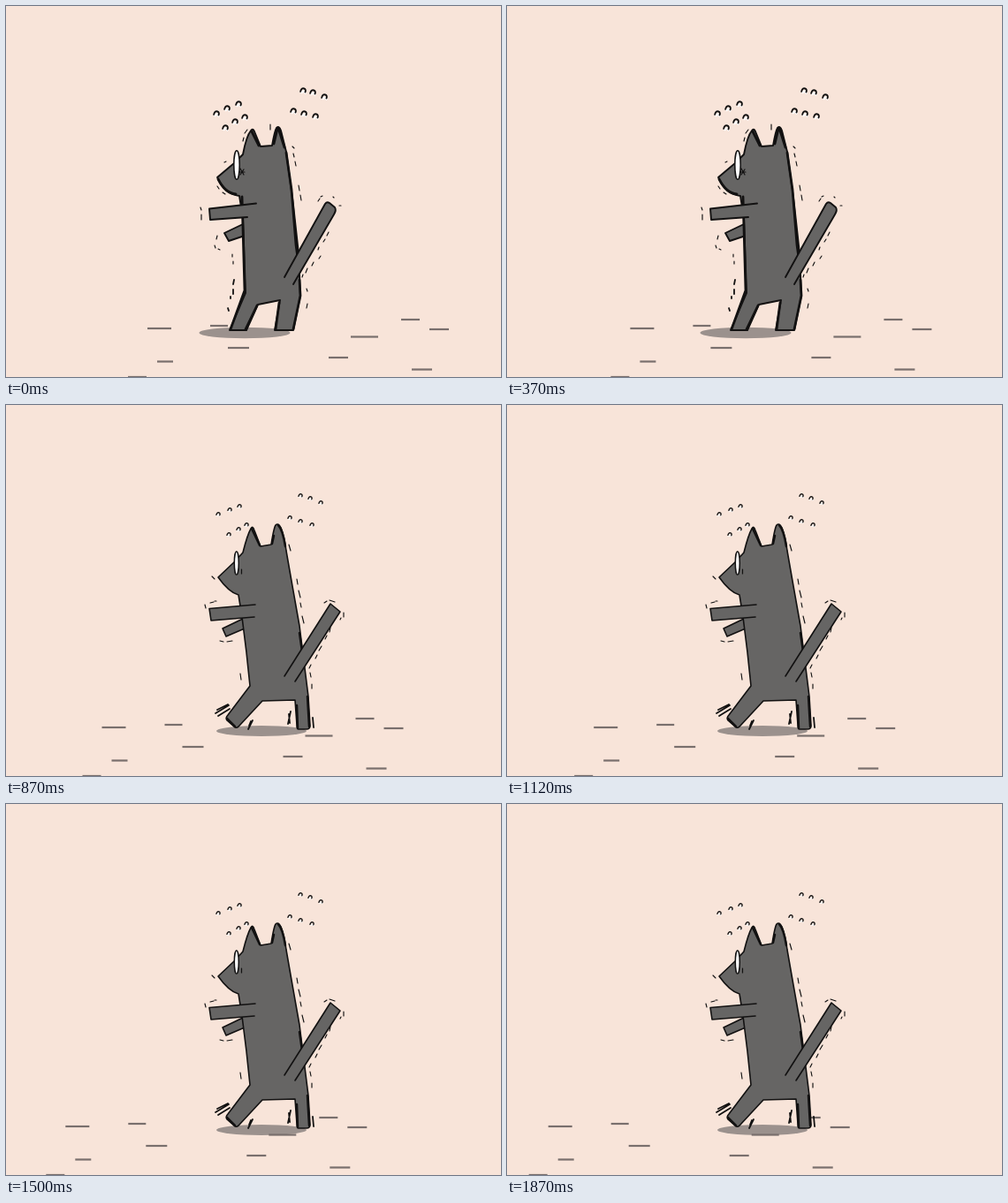
Animation, 560 px wide and 420 px high, one loop 2 s. Source, as an HTML page with a canvas:

```html
<!DOCTYPE html>
<html lang="en">
<head>
<meta charset="utf-8">
<title>Walking cat</title>
<style>
html, body { margin: 0; width: 100%; height: 100%; overflow: hidden; background: #f8e4d9; }
canvas { display: block; }
</style>
</head>
<body>
<canvas id="stage" width="560" height="420"></canvas>
<script>
const ctx = document.getElementById('stage').getContext('2d');
const INK = '#121111', FUR = '#666564';

// x, y, width of the ground dashes at the start of the loop
const dashes = [
  [160, 365, 27], [231, 362, 20], [447, 355, 21], [479, 366, 22], [390, 374.5, 31],
  [251, 387, 24], [365, 398, 22], [171, 402.5, 18], [459, 411.5, 23], [138, 420, 21]
];

// The three poses of the walk, in playing order
const poses = [
  {
    line: 1.9, curl: 1.25, shadow: [270, 370, 51.5, 6.3],
    body: 'M239 194L258 178L268 168Q272 147 277 141Q279 138 281 142L288 159L301 158Q304 141 306 138Q309 135 311 141L317 165L325 225L331 280L333 328L325 367H304L310 333L285 338L272 367H253L271 325L268 240L264 215Q247 213 239 194Z',
    bold: 'M317 166L323 208L328 270L331 292M332 310L333 328L325 366M267 216L268 250L270 322L254 366M278 142L286 158M307 139L303 156M308 138L315 160M309 336L305 366M284 339L271 366M240 196Q248 212 260 213',
    tail: 'M315 307L361 224Q363 221 366 223L372 228Q374 231 371 236L325 315',
    arm: 'M283 223.5L230 229.5L231 242L273 239',
    back: 'M270 246L247 257L252 266L270 260',
    lens: [261, 180, 3.2, 16.3], eye: 'M265 184l4 7M269 185l-4 6M264 188h6',
    curls: [[238, 121], [250, 115], [263, 110], [248, 137], [259, 130], [270, 125],
            [336, 95], [347, 97], [360, 102], [325, 118], [337, 121], [350, 124]],
    marks: 'M273 140l-3 4M269 149l-1 4M299 134v6M324 159l2 2M325 167l1 4M327 176l1 5M331 203l1 6M333 214l1 6M353 221l2-3M356 216l2-1M370 216l1 1M377 226h2M365 256l-2 4M361 264l-2 3M354 273l-1 3M356 283l-2 3M348 290l-2 4M341 297l-2 5M336 304l-1 3M340 320l1 3M341 337l-1 5M247 177l2-1M239 204l2 3M245 211l3 2M220 228l1 3M221 236v6M239 260l-1 4M236 271l1 3M240 275l2 1M256 281v3M257 289v3',
    jolts: 'M258 310l-1 5M257 321v5M254 329v2M251 342l1 3'
  },
  {
    line: 1.6, curl: .9, shadow: [289, 369, 51, 6],
    body: 'M240 195L258 178L268 167Q273 147 277 140Q279 136 281 142L288 160L300 158Q303 139 305 136Q308 133 311 139Q315 149 317 165L324 205L332 250L337 290L342 330L344 363Q344 367 340 367H331Q329 367 329 362L327 334L290 335L264 363Q261 367 258 364L250 357Q248 354 251 351L276 318L272 280L267 240L263 215Q252 212 240 195Z',
    bold: 'M278 140L287 159M308 136Q313 141 316 160M303 148L301 157M250 355L259 364M341 330L343 364M332 258L336 286M329 340L330 366',
    tail: 'M315 307L367 225L378 234L327 313',
    arm: 'M282 226L230 230.5L232 244L281 240',
    back: 'M270 241L245 253L249 262L270 253',
    lens: [260.8, 179, 2.5, 13.3], eye: 'M266.500 186v5',
    curls: [[240, 123], [253, 118], [264, 114], [252, 146], [263, 140], [272, 135],
            [333, 102], [344, 105], [356, 110], [321, 127], [333, 131], [346, 135]],
    marks: 'M233 194l3 3M225 226l1 4M231 224l4-1M236 222h2M242 267l4 1M250 268l6-1M265 304l1 7M320 158l2 7M329 197l1 6M331 210l2 8M333 224l1 5M335 239l2 8M360 224l3-2M366 221l6 2M382 235v5M379 241l-1 2M367 252l-1 5M363 261l-2 4M357 273l-3 5M352 283l-2 4M345 294l-2 4M344 303l1 5M346 316v5',
    jolts: 'M237 349L252 340M239 345L251 339M240 352L253 344M279 357L274 367M277 358L275 363M322 347L319 361M320 350L321 360M347 354L348 365'
  },
  {
    line: 1.5, curl: .9, shadow: [282, 368.5, 42, 6],
    body: 'M240 195L257 178L267 169Q272 149 277 141Q279 138 281 142L289 161L299 158Q303 140 305 137Q308 134 311 141Q314 150 316 162L322 200L326 240L331 280L334 310Q334 326 329 340L320 367H300L310 332L287 338L275 367L260 366L273 318L268 255L264 216Q250 211 240 195Z',
    bold: 'M307 137Q312 143 315 160M331 284L334 312L330 336M315 164L320 192M278 141L287 158',
    tail: 'M315 306L358 221L369 228.500L325 314',
    arm: 'M285 226.500L231 223L230 236L287 242',
    back: 'M270 249L246 262Q249 270 253 271L270 262',
    lens: [260.6, 179, 2, 12.3], eye: 'M266 186v6',
    curls: [[238, 121], [251, 115], [263, 111], [248, 140], [261, 134], [270, 129],
            [335, 97], [347, 99], [358, 104], [325, 119], [337, 123], [349, 127]],
    marks: 'M239 189l-2 3M237 202l2 2M240 206l2 2M227 220l2-1M231 219l4-1M225 235l1 1M226 240l5 1M235 241h3M241 241h5M261 274l1 9M327 197l1 6M329 209v5M330 219v3M331 228l1 8M332 243l1 4M333 258v5M365 249l-2 5M361 259l-2 4M357 267l-2 5M352 276l-1 3M349 285l-2 5M341 295l-1 9M336 303l-1 3',
    jolts: 'M264 304v4M265 312v3M268 333L262 351M266 337L263 347M259 338L255 349M337 328L334 337M330 345L327 360M329 350L327 358'
  }
];

function stroke(path, width, color = INK) {
  ctx.lineWidth = width;
  ctx.strokeStyle = color;
  ctx.stroke(new Path2D(path));
}

function shape(path, width) {
  ctx.fillStyle = FUR;
  ctx.fill(new Path2D(path));
  stroke(path, width);
}

function ellipse([x, y, rx, ry], color) {
  ctx.beginPath();
  ctx.ellipse(x, y, rx, ry, 0, 0, Math.PI * 2);
  ctx.fillStyle = color;
  ctx.fill();
}

function curl([x, y], size) {
  ctx.save();
  ctx.translate(x, y);
  ctx.scale(size, size);
  stroke('M-1 2.500Q0 0 2 2.800', 1.8, '#fff');
  stroke('M-2.300 1.500Q-1.500 -2 1 -1.200Q3 -.5 2 2', 1.5);
  ctx.restore();
}

function drawCat(p) {
  shape(p.back, p.line);
  shape(p.body, p.line);
  stroke(p.bold, p.line + .9);
  shape(p.tail, p.line);
  shape(p.arm, p.line);
  ellipse(p.lens, '#fff');
  ctx.lineWidth = 1.5;
  ctx.stroke();
  stroke(p.eye, 1.2);
  stroke(p.marks, 1.15);
  stroke(p.jolts, 1.8);
  p.curls.forEach(c => curl(c, p.curl));
}

function draw(now) {
  const t = now % 2000;
  const tick = 2 * Math.floor(t / 250) + (t % 250 >= 120);
  const pose = poses[Math.floor(tick * 9 / 8) % 3];
  const scroll = Math.floor(tick * 3 / 4) * 10.3;

  ctx.fillStyle = '#f8e4d9';
  ctx.fillRect(0, 0, 560, 420);
  ellipse(pose.shadow, '#9b918d');
  ctx.fillStyle = '#796f6d';
  for (const [x, y, w] of dashes) ctx.fillRect(x - scroll, y - 1.1, w, 2.2);
  drawCat(pose);
}

ctx.lineCap = ctx.lineJoin = 'round';
const start = performance.now();
(function loop() {
  draw(performance.now() - start);
  requestAnimationFrame(loop);
})();
</script>
</body>
</html>
```
